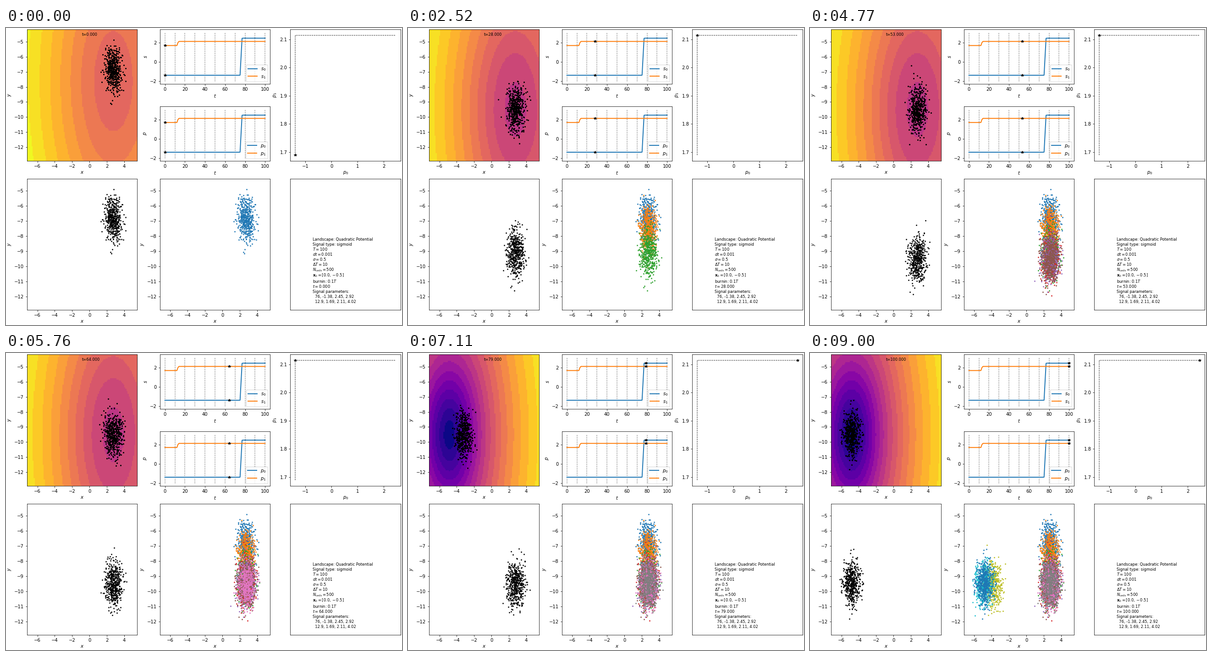
Write a matplotlib script that moves like this. It is 864 by 648 pixels and loops after 9090 ms.

```python
import numpy as np
import matplotlib.pyplot as plt
from matplotlib.animation import FuncAnimation

W, H, DPI = 864, 648, 72
T, CELLS, SIGMA, GAP = 100, 500, 0.5, 10
RATE = np.array([0.5, 2 / 9])          # curvature of the bowl along x and y
XLIM, YLIM = (-7.2, 5.5), (-12.9, -4.18)
SHADES = 18
SMALL = 10 / 1.2

plt.rcParams.update({"font.family": "DejaVu Sans", "font.size": 10})


def signal(t):
    """Two sigmoid switches, one per component."""
    def sigmoid(center, start, end, rate):
        return start + (end - start) * (1 + np.tanh(rate * (t - center))) / 2
    return np.array([sigmoid(76, -1.38, 2.45, 2.92),
                     sigmoid(12.9, 1.69, 2.1146, 4.02)])


def simulate(dt=0.05, burn_in=10):
    """Noisy descent of all cells; returns their places at t = 0, 1, ..., T."""
    rng = np.random.default_rng(12)
    cells = np.tile([0.0, -0.5], (CELLS, 1))
    per_unit = round(1 / dt)
    path = []
    for step in range((burn_in + T) * per_unit + 1):
        if step % per_unit == 0 and step >= burn_in * per_unit:
            path.append(cells.copy())
        drift = -(RATE * cells + signal(step * dt - burn_in))
        noise = rng.normal(size=cells.shape)
        cells = cells + drift * dt + SIGMA * np.sqrt(dt) * noise
    return np.array(path)


times = np.arange(T + 1)
path = simulate()
curves = signal(times)

# Landscape on a coarse grid, coloured on a shared logarithmic scale
gx, gy = np.meshgrid(np.linspace(*XLIM, 100), np.linspace(*YLIM, 100))


def potential(t):
    p0, p1 = curves[:, t]
    return RATE[0] / 2 * gx**2 + RATE[1] / 2 * gy**2 + p0 * gx + p1 * gy


heights = [potential(t) for t in times]
low, high = np.min(heights), np.max(heights)


def landscape(t):
    level = np.log1p(heights[t] - low) / np.log1p(high - low)
    return np.round(level * SHADES) / SHADES


fig = plt.figure(figsize=(W / DPI, H / DPI), dpi=DPI, facecolor="white")
COLS, WIDTH = (45.8, 335.7, 620.4), 240.6
UPPER, LOWER = (3, 289.6), (328.55, 615.1)


def panel(col, rows, xlabel="", ylabel=""):
    top, bottom = rows
    ax = fig.add_axes([COLS[col] / W, 1 - bottom / H, WIDTH / W, (bottom - top) / H])
    ax.set_xlabel(xlabel, labelpad=3)
    ax.set_ylabel(ylabel)
    return ax


def cell_panel(col, rows):
    ax = panel(col, rows, "$x$", "$y$")
    ax.set(xlim=XLIM, ylim=YLIM, xticks=range(-6, 5, 2), yticks=range(-12, -4))
    return ax


def dots(ax, color, alpha=0.85):
    return ax.plot([], [], "o", ms=3.1, mew=0, color=color, alpha=alpha)[0]


def star(ax):
    return ax.plot([], [], "*", ms=6, color="k", zorder=5)[0]


def signal_panel(rows, name):
    ax = panel(1, rows, "$t$", f"${name}$")
    for i, curve in enumerate(curves):
        ax.plot(times, curve, color=f"C{i}", lw=2, label=f"${name}_{i}$")
    ax.vlines(range(0, T + 1, GAP), -2, 3, colors="k", linestyles=":",
              linewidth=1.5, alpha=0.6, zorder=1)
    ax.set(xlim=(-5, 105), ylim=(-2.26, 3.36),
           xticks=range(0, 101, 20), yticks=(-2, 0, 2))
    ax.legend(loc="lower right")
    return star(ax)


# Top row
ax_land = cell_panel(0, UPPER)
image = ax_land.imshow(landscape(0), cmap="plasma", vmin=0, vmax=1, origin="lower",
                       extent=(*XLIM, *YLIM), aspect="auto", interpolation="nearest")
live = dots(ax_land, "k", alpha=1)
clock = ax_land.text(0.5, 0.95, "", transform=ax_land.transAxes, fontsize=SMALL)

signal_stars = [signal_panel((3, 121.7), "s"), signal_panel((170.9, 289.6), "p")]

ax_plane = panel(2, UPPER, "$p_0$", "$p_1$")
ax_plane.plot(*curves, "k:")
ax_plane.set(xlim=(-1.5715, 2.6415), ylim=(1.669, 2.1355),
             xticks=range(-1, 3), yticks=np.arange(1.7, 2.15, 0.1))
plane_star = star(ax_plane)

# Bottom row
latest = dots(cell_panel(0, LOWER), "k")
ax_all = cell_panel(1, LOWER)
snapshots = [dots(ax_all, f"C{i % 10}") for i in range(T // GAP + 1)]
for i, snap in enumerate(snapshots):
    snap.set_data(*path[i * GAP].T)

ax_info = panel(2, LOWER)
ax_info.set(xticks=[], yticks=[])
INFO = [
    "Landscape: Quadratic Potential",
    "Signal type: sigmoid",
    "$T=100$",
    "$dt=0.001$",
    r"$\sigma=0.5$",
    r"$\Delta T=10$",
    "$N_{cells}=500$",
    r"$\mathbf{x}_0=[0.0, -0.5]$",
    "burnin: $0.1T$",
    "$t=0.000$",
    "Signal parameters:",
    "  76, -1.38, 2.45, 2.92",
    "  12.9, 1.69, 2.11, 4.02",
]
info_lines = []
baseline, above = 453, ""
for line in INFO:
    # The bracketed line is taller and pushes its neighbours away
    baseline += 13 if "[" in line + above else 11
    info_lines.append(fig.text((COLS[2] + 0.2 * WIDTH) / W, 1 - baseline / H,
                               line, fontsize=SMALL))
    above = line
info_time = next(text for text in info_lines if text.get_text().startswith("$t="))


def update(t):
    image.set_data(landscape(t))
    live.set_data(*path[t].T)
    clock.set_text(f"t={t:.3f}")
    for mark in signal_stars:
        mark.set_data([t, t], curves[:, t])
    plane_star.set_data(curves[:1, t], curves[1:, t])
    last = t // GAP
    latest.set_data(*path[last * GAP].T)
    for i, snap in enumerate(snapshots):
        snap.set_visible(i <= last)
    info_time.set_text(f"$t={t:.3f}$")
    return []


anim = FuncAnimation(fig, update, frames=T + 1, interval=90,
                     init_func=lambda: update(0), repeat=True, repeat_delay=0)
plt.show()
```
